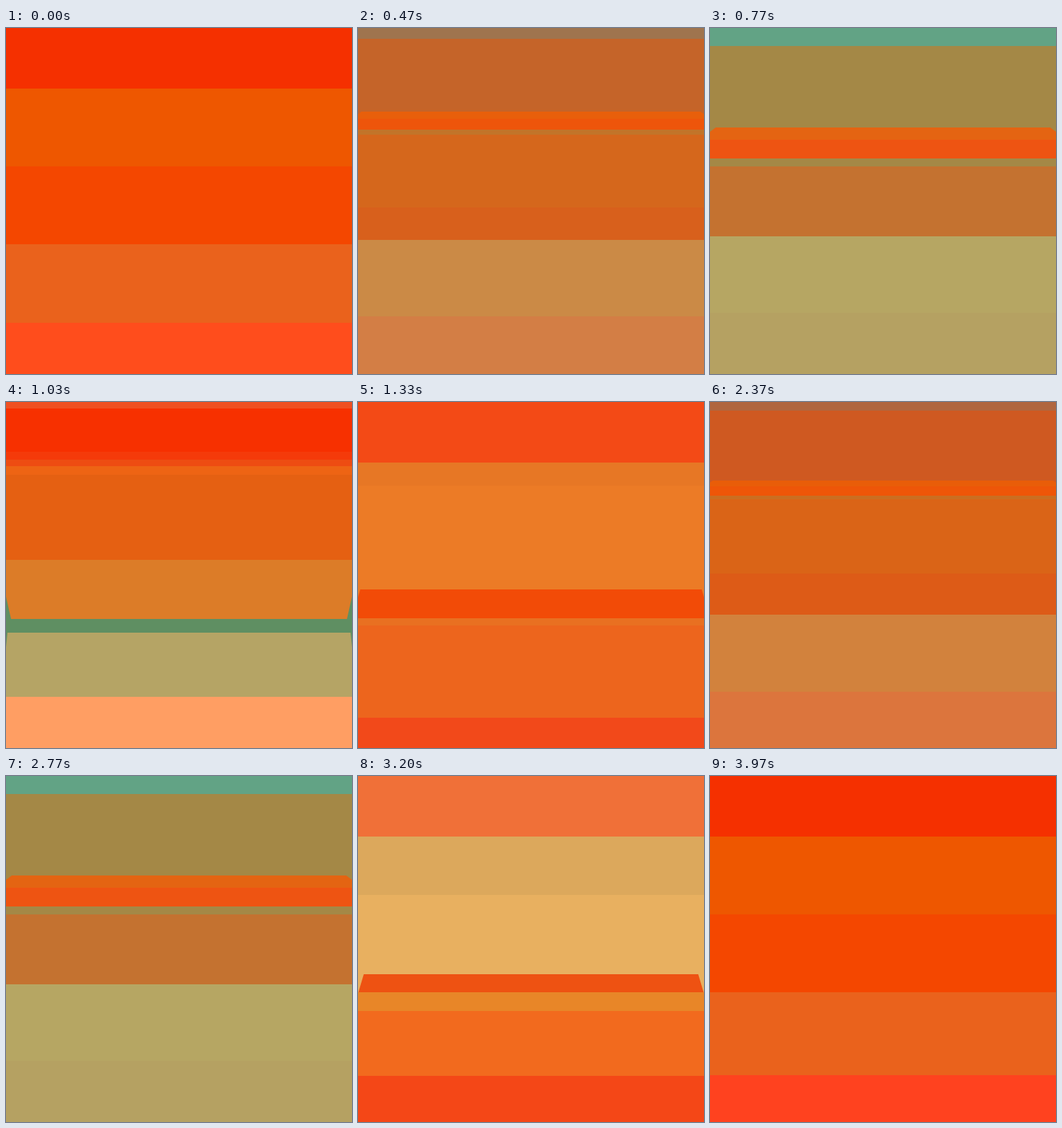
An HTML page that plays this animation: 480x480 px, repeating every 4010 ms.

```html
<!DOCTYPE html>
<html lang="en">
<head>
<meta charset="utf-8">
<title>Folding stripes</title>
<style>
html, body { margin: 0; width: 100%; height: 100%; overflow: hidden; background: #f53000; }
svg { display: block; width: 100%; height: 100%; }
</style>
</head>
<body>
<svg id="stage" viewBox="0 0 480 480"></svg>
<script>
const SIZE = 480, LOOP = 4010, STEPS = 48;

// A pose holds the top edge and colour of every band; bevels are [inset, drop].
const pose = (at, tops, colors, bevels = {}) => ({
  at, tops, bevels,
  colors: colors.split(' ').map(c => [0, 2, 4].map(i => parseInt(c.substr(i, 2), 16)))
});

// Settled stripes, with the two edges that still travel.
const rest = (at, mid, low, lowColor = 'ff421f') => pose(at,
  [0, 0, 84, 84, 84, 84, 84, mid, 300, 300, low],
  'f53000 f53000 ' + 'ee5700 '.repeat(5) + 'f44700 ea621c ea621c ' + lowColor);

const poses = [
  rest(1, 192, 408, 'ff4d1c'),
  pose(18, [0, 25, 138, 155, 181, 192, 192, 289, 289, 289, 395],
    '62a385 a48846 e46412 ee5412 a48846 e46412 c47230 c47230 62a385 b6a663 b5a162',
    { 2: [8, 6] }),
  pose(25, [0, 9, 69, 80, 89, 101, 219, 301, 301, 320, 409],
    'f05022 f73000 f53a0a ee4c12 ee6414 e56012 dc7c28 5f8f62 5f8f62 b5a465 ff9e63',
    { 8: [7, -31], 9: [2, 20] }),
  pose(29, [0, 0, 84, 84, 84, 84, 165, 275, 300, 326, 416],
    'f07038 f07038 dca85c dca85c dca85c dca85c e8b060 ee5212 e88628 f26a1e f44717',
    { 7: [8, 27] }),
  rest(34, 250, 452, 'f04a1c'),
  rest(39, 208, 480),
  rest(40, 196, 480),
  rest(41, 192, 480),
  rest(43, 192, 516),
  rest(44, 192, 477, 'f0431f'),
  rest(45, 192, 452),
  rest(46, 192, 431),
  rest(47, 192, 415),
  rest(48, 192, 409, 'ff4d1c'),
  rest(49, 192, 408, 'ff4d1c')
];

const stage = document.getElementById('stage');
const bands = poses[0].tops.map(() =>
  stage.appendChild(document.createElementNS('http://www.w3.org/2000/svg', 'polygon')));

const mix = (a, b, p) => a + (b - a) * p;

function stepAt(ms) {
  const tick = Math.min(119, Math.floor((ms % LOOP + 5) * 0.03));
  // 24 drawings a second shown on a 30 Hz clock
  return Math.floor(tick * 0.8 + 0.3) % STEPS;
}

function draw(ms) {
  const step = stepAt(ms) || STEPS;
  const next = poses.findIndex(q => q.at > step);
  const a = poses[next - 1], b = poses[next];
  const p = (step - a.at) / (b.at - a.at);
  bands.forEach((band, i) => {
    const top = Math.round(mix(a.tops[i], b.tops[i], p));
    const from = a.bevels[i] || [0, 0], to = b.bevels[i] || [0, 0];
    const inset = mix(from[0], to[0], p), side = top + mix(from[1], to[1], p);
    const floor = Math.max(SIZE, top, side);
    band.setAttribute('points',
      `0,${side} ${inset},${top} ${SIZE - inset},${top} ${SIZE},${side} ${SIZE},${floor} 0,${floor}`);
    const rgb = a.colors[i].map((v, j) => Math.round(mix(v, b.colors[i][j], p)));
    band.setAttribute('fill', `rgb(${rgb})`);
  });
}

function frame() {
  draw(performance.now());
  requestAnimationFrame(frame);
}
frame();
</script>
</body>
</html>
```
